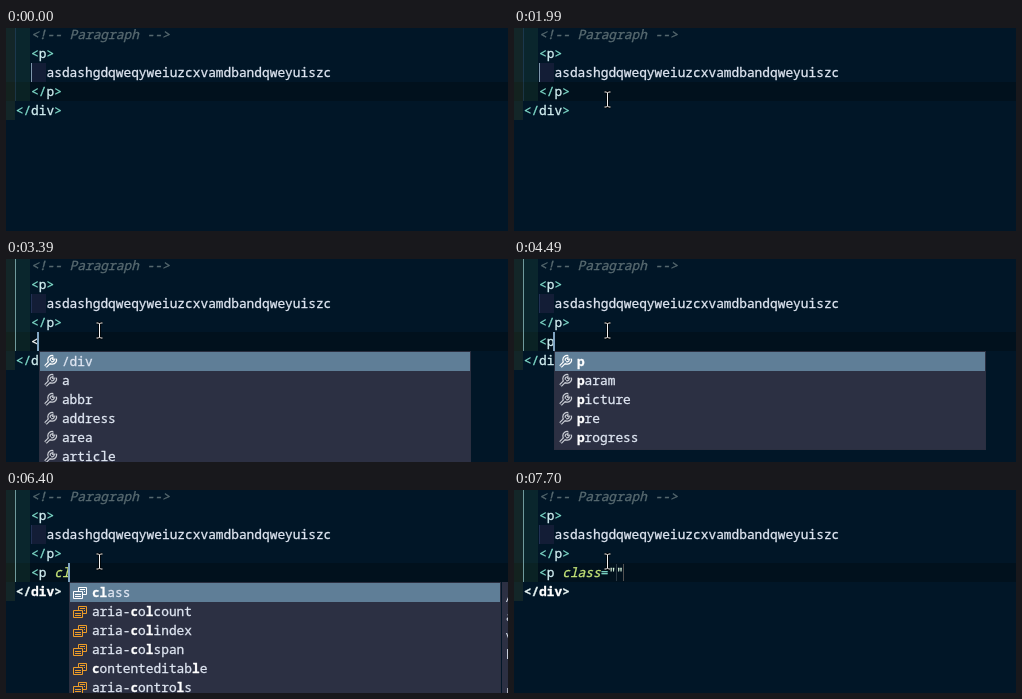
An HTML page with a canvas for the animation above (8 s loop, 502 by 203 pixels).

```html
<!DOCTYPE html>
<html lang="en">
<head>
<meta charset="utf-8">
<title>Typing a tag</title>
<style>
  html, body { margin: 0; width: 100%; height: 100%; overflow: hidden; background: #011627; }
  canvas { display: block; }
</style>
</head>
<body>
<canvas id="stage" width="502" height="203"></canvas>
<script>
const ctx = document.getElementById('stage').getContext('2d');
const LOOP = 8000, CHAR = 7.7, LINE = 19, INDENT = [8.8, 24.2, 39.6];
const MONO = '12.83px "Noto Sans Mono", monospace';
const TEAL = '#7fdbca', TAG = '#d3eff2', PLAIN = '#dfe6f2', ATTR = '#c5e478';
const BANDS = ['rgba(255,255,64,.07)', 'rgba(127,255,127,.07)', 'rgba(255,127,255,.07)'];

// [time, text on the new line]
const typing = [
  [2640, ''], [3320, '<'], [4490, '<p'], [5920, '<p '], [6170, '<p c'],
  [6400, '<p cl'], [6600, '<p cla'], [7240, '<p class=""']
];
const caretHidden = [[0, 1470], [1990, 2470], [3150, 3320], [3810, 4290], [4950, 5460], [7700, 8000]];
const mousePath = [
  [500, 407, 199], [620, 396, 186], [760, 295, 145], [850, 250, 125],
  [1000, 150, 89], [1180, 93, 71], [1300, 98, 73], [1470, 98, 73], [1580, 93, 71]
];

const tags = ['/div', 'a', 'abbr', 'address', 'area', 'article'];
const pTags = ['p', 'param', 'picture', 'pre', 'progress'];
const cAttrs = ['class', 'contenteditable', 'contextmenu', 'aria-checked', 'aria-colcount', 'aria-colindex'];
const clAttrs = ['class', 'aria-colcount', 'aria-colindex', 'aria-colspan', 'contenteditable', 'aria-controls'];
const claAttrs = ['class', 'aria-colspan'];
const pDoc = ['The p element', 'paragraph.'];
const classDoc = ['A space-separated', 'allows CSS and', 'via the class', 'like the', '', 'HTML Reference'];
const popups = [
  { from: 3390, to: 4490, x: 33, query: '', items: tags, icon: wrench },
  { from: 4490, to: 4550, x: 40, query: 'p', items: pTags, icon: wrench },
  { from: 4550, to: 5920, x: 40, query: 'p', items: pTags, icon: wrench, doc: pDoc },
  { from: 6230, to: 6400, x: 55, query: 'c', items: cAttrs, icon: blocks, doc: classDoc },
  { from: 6400, to: 6600, x: 63, query: 'cl', items: clAttrs, icon: blocks, doc: classDoc },
  { from: 6600, to: 6730, x: 63, query: 'cla', items: claAttrs, icon: blocks },
  { from: 6730, to: 7240, x: 70, query: 'cla', items: claAttrs, icon: blocks }
];

const lineTop = row => row * LINE - 3;
const during = (t, from, to) => t >= from && t < to;

function rect(x, y, w, h, color) {
  ctx.fillStyle = color;
  ctx.fillRect(x, y, w, h);
}

// The thin outline gives the slightly heavier weight of screen-hinted type
function text(str, x, y, color, style = '') {
  ctx.font = `${style} ${MONO}`;
  ctx.fillStyle = ctx.strokeStyle = color;
  ctx.lineWidth = .3;
  ctx.fillText(str, x + .9, y);
  ctx.strokeText(str, x + .9, y);
  return x + str.length * CHAR;
}

// Each part is [string, color, style]
function codeLine(row, indent, ...parts) {
  let x = INDENT[indent];
  for (const part of parts) x = text(part[0], x, lineTop(row) + 14, part[1], part[2]);
}

function stroke(color, width, path) {
  ctx.strokeStyle = color;
  ctx.lineWidth = width;
  ctx.stroke(new Path2D(path));
}

function wrench(selected) {
  const shape = 'M-4.5 4.5L1 -1M3 -5.3A3.2 3.2 0 1 0 5.3 -3';
  stroke(selected ? '#fff' : '#c9ccd4', 3.6, shape);
  stroke(selected ? '#5f7e97' : '#2c3043', 1.2, shape);
  stroke(selected ? '#fff' : '#c9ccd4', 1.2, 'M3 -5.5L2.7 -2.7L5.5 -3');
}

function blocks(selected) {
  stroke(selected ? '#fff' : '#ee9d28', 1,
    'M-1.5 -1.5V-5.5H6.5V1.5H2.5M-6.5 -1.5H2.5V5.5H-6.5ZM-5 1.5H1M-5 3.5H1M0 -3.5H5M4 -1.5H5');
}

function popup({ x, query, items, icon, doc }) {
  const top = lineTop(5);
  rect(x, top, 432, items.length * LINE + 4, '#2b2f40');
  rect(x + 1, top + 1, 430, items.length * LINE + 2, '#2c3043');
  rect(x + 1, top + 1, 430, LINE, '#5f7e97');
  items.forEach((item, i) => {
    const y = top + 1 + i * LINE;
    ctx.save();
    ctx.translate(x + 11, y + 10);
    icon(i === 0);
    ctx.restore();
    let matched = 0, at = x + 22;
    const start = item.indexOf(query[0]);
    [...item].forEach((c, k) => {
      const hit = k >= start && c === query[matched];
      if (hit) matched++;
      at = text(c, at, y + 14, hit ? '#fff' : PLAIN, hit ? 'bold' : '');
    });
  });
  if (doc) {
    rect(x + 433, top, 100, doc.length * LINE + 22, '#2c3043');
    ctx.font = '13px "Open Sans", sans-serif';
    ctx.fillStyle = PLAIN;
    doc.forEach((line, i) => ctx.fillText(line, x + 437, top + 20 + i * LINE));
  }
}

function mouse(t) {
  if (t < mousePath[0][0]) return;
  let [, x, y] = mousePath.at(-1);
  const i = mousePath.findIndex(p => p[0] > t);
  if (i > 0) {
    const [t0, x0, y0] = mousePath[i - 1], [t1, x1, y1] = mousePath[i];
    const k = (t - t0) / (t1 - t0);
    x = Math.round(x0 + (x1 - x0) * k);
    y = Math.round(y0 + (y1 - y0) * k);
  }
  ctx.save();
  ctx.translate(x + .5, y + .5);
  const beam = 'M-3 -7.5H-1L0 -6.5L1 -7.5H3M0 -6.5V6.5M-3 7.5H-1L0 6.5L1 7.5H3';
  stroke('#000', 2.4, beam);
  stroke('#f4f4f4', 1, beam);
  ctx.restore();
}

function draw(t) {
  const added = t >= 2640;
  const typed = added ? typing.findLast(step => step[0] <= t)[1] : '';
  const row = added ? 4 : 3, closing = row + 1;

  rect(0, 0, 502, 203, '#011627');
  rect(0, lineTop(row), 502, LINE, '#01111d');
  rect(0, 0, 9, lineTop(closing + 1), BANDS[0]);
  rect(9, 0, 15, lineTop(closing), BANDS[1]);
  rect(25, lineTop(2), 15, LINE, BANDS[2]);
  const active = '#7e97ac', idle = 'rgba(94,129,206,.2)';
  rect(9, 0, 1, lineTop(closing), added ? '#6f9a9c' : idle);
  rect(25, lineTop(2), 1, LINE, added ? idle : active);

  codeLine(0, 1, ['<!-- Paragraph -->', '#586a70', 'italic']);
  codeLine(1, 1, ['<', TEAL], ['p', TAG], ['>', TEAL]);
  codeLine(2, 2, ['asdashgdqweqyweiuzcxvamdbandqweyuiszc', PLAIN]);
  codeLine(3, 1, ['</', TEAL], ['p', TAG], ['>', TEAL]);
  const broken = t >= 4550;
  const edge = broken ? ['#e4f1f0', '600'] : [TEAL];
  codeLine(closing, 0, ['</', ...edge], ['div', broken ? '#fff' : TAG, edge[1]], ['>', ...edge]);

  const [, bracket, name, attr, equals, quotes] = typed.match(/(<?)(p? ?)(\w*)(=?)("*)/);
  codeLine(4, 1, [bracket, name ? TEAL : '#fff'], [name, TAG], [attr, ATTR, 'italic'], [equals, TEAL], [quotes, '#d9f5dd']);

  const inner = typed.endsWith('""');
  const column = added ? typed.length - (inner ? 1 : 0) : 4;
  const caretX = Math.floor(INDENT[1] + column * CHAR + .05);
  if (inner) {
    rect(caretX + 1, 74, 1, 17, '#2c3a45');
    rect(caretX + 8, 74, 1, 17, '#525252');
  }
  if (!caretHidden.some(([from, to]) => during(t, from, to))) {
    rect(caretX, lineTop(row), 2, LINE, '#80a4c2');
  }

  const open = popups.find(p => during(t, p.from, p.to));
  if (open) popup(open);
  mouse(t);
}

function frame() {
  draw(performance.now() % LOOP);
  requestAnimationFrame(frame);
}
frame();
</script>
</body>
</html>
```
